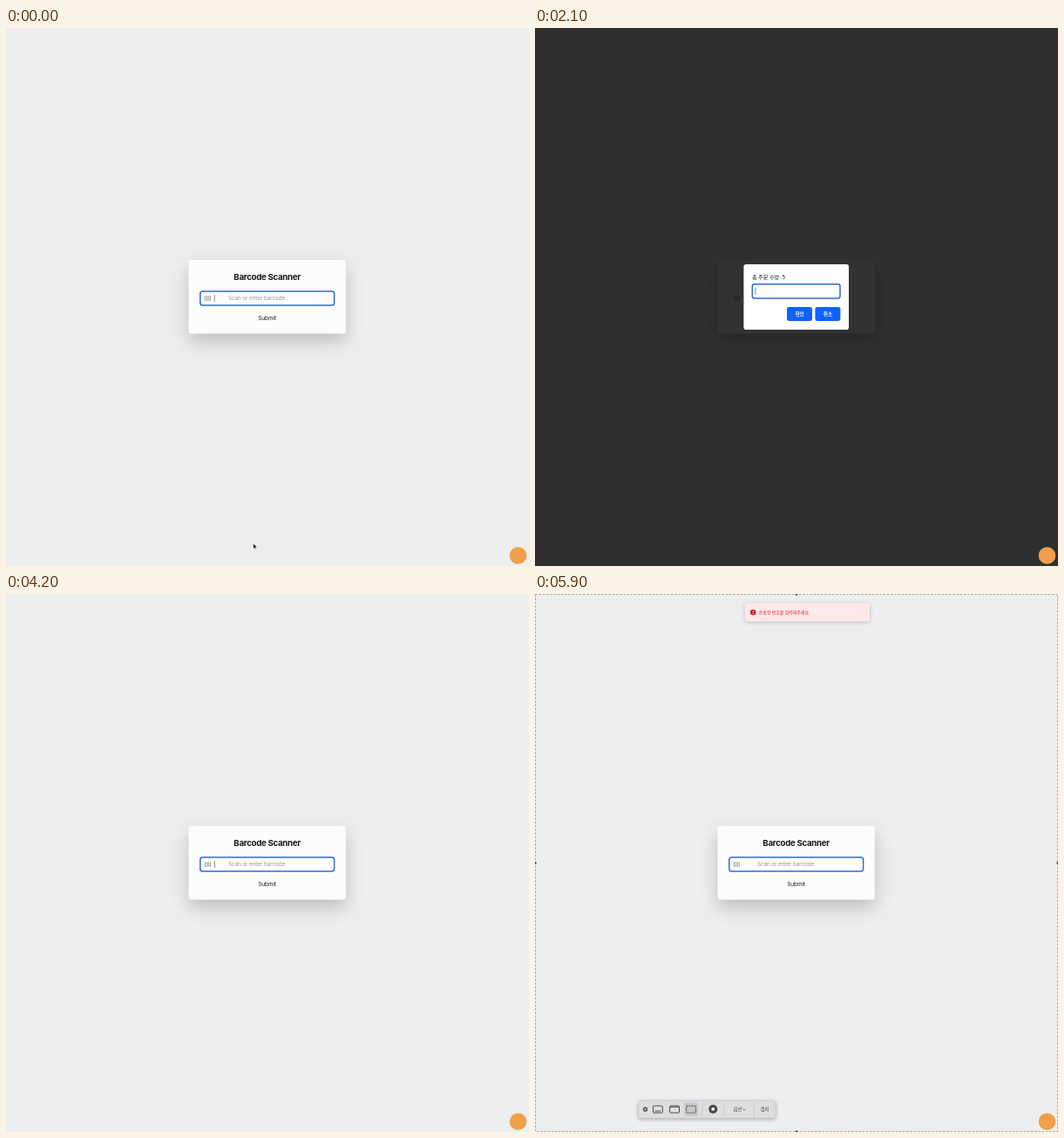
An HTML page that plays this animation: 600x617 px, repeating every 6000 ms.

```html
<!DOCTYPE html>
<html lang="en">
<head>
<meta charset="utf-8">
<title>Barcode Scanner</title>
<style>
  html, body { margin: 0; width: 100%; height: 100%; overflow: hidden; background: #edeef0; }
  svg { display: block; width: 600px; height: 617px; }
  text { font-family: Inter, "Noto Sans CJK KR", "Noto Sans CJK", sans-serif; font-size: 6.43px; fill: #18181b; }
  .mid { text-anchor: middle; }
  .card { filter: drop-shadow(0 9px 10px rgba(0, 0, 0, .2)); }
  .toast { filter: drop-shadow(0 1px 2px rgba(0, 0, 0, .2)); }
  .bar { filter: drop-shadow(0 1px 2px rgba(0, 0, 0, .3)); }
  .ring { fill: #fff; stroke: #2f6bd3; stroke-width: 1.5; }
  .ring.blur { stroke: #d4d4d8; stroke-width: .5; }
  .caret { fill: #666; }
  .btn { fill: #0f62fe; }
  .btn-text { font-size: 5.5px; font-weight: 700; fill: #fff; }
  .icon { fill: none; stroke: #4a4a4c; stroke-width: 1; }
  .sep { stroke: #c3c3c6; stroke-width: .6; }
  .bar text { font-size: 5.2px; fill: #48484a; }
</style>
</head>
<body>
<svg viewBox="0 0 600 617" xmlns="http://www.w3.org/2000/svg">
  <rect width="600" height="617" fill="#edeef0"/>

  <rect class="card" x="209.5" y="266" width="180.3" height="84.5" rx="3.2" fill="#fcfcfc"/>
  <text class="mid" x="299.6" y="289" style="font-size:9.65px;font-weight:700;letter-spacing:-.27px">Barcode Scanner</text>
  <rect id="codeBox" class="ring" x="222.8" y="302" width="153.8" height="16.1" rx="2.8"/>
  <path d="M228 307.2v5.8M229.7 307.2v5.8M231.3 307.2v5.8M232.9 307.2v5.8M234.5 307.2v5.8" stroke="#a2a6ad" stroke-width=".95"/>
  <text id="hint" x="254.9" y="312.3" style="fill:#9197a1;letter-spacing:-.12px">Scan or enter barcode</text>
  <text id="code" x="238.8" y="312.3"></text>
  <rect id="codeCaret" class="caret" y="306" width=".8" height="8"/>
  <text class="mid" x="299.6" y="335.4" style="letter-spacing:-.08px">Submit</text>

  <g id="modal">
    <rect width="600" height="617" opacity=".8"/>
    <rect x="239.4" y="271" width="120.6" height="75" rx="2.8" fill="#fff"/>
    <text x="248.9" y="287.7" style="font-size:6.2px;letter-spacing:-.1px">총 주문 수량: 5</text>
    <rect class="ring" x="249.3" y="293.8" width="100.7" height="16.2" rx="2.4"/>
    <text id="answer" x="252.5" y="304.2"></text>
    <rect id="answerCaret" class="caret" y="298" width=".8" height="8"/>
    <rect class="btn" x="289" y="320" width="29" height="16" rx="2.4"/>
    <text class="mid btn-text" x="303.5" y="330">확인</text>
    <rect class="btn" x="321.4" y="320" width="29" height="16" rx="2.4"/>
    <text class="mid btn-text" x="335.9" y="330">취소</text>
  </g>

  <g id="toast">
    <rect class="toast" x="240.8" y="10.4" width="143.2" height="21.2" rx="2" fill="#fde8ea"/>
    <circle cx="250.2" cy="21" r="3.3" fill="#d01f2a"/>
    <path d="M250.2 19.1v2.2M250.2 22.2v.8" stroke="#fff" stroke-width=".8"/>
    <text x="256.8" y="22.9" style="font-size:4.95px;font-weight:500;fill:#d5242c">운송장 번호를 입력해주세요.</text>
  </g>

  <circle cx="587.5" cy="605" r="9.8" fill="#efa04a"/>
  <path id="mouse" d="M283.8 591.2v6l1.4-1.3 .9 2.1 .9-.4-.9-2h1.9z" fill="#111" stroke="#fff" stroke-width=".4"/>

  <g id="capture">
    <rect x=".5" y=".5" width="599" height="616" fill="none" stroke="#929294" stroke-width=".8" stroke-dasharray="2.4 1.8"/>
    <g fill="#444">
      <circle cx="300" cy=".5" r="1.2"/><circle cx="300" cy="616.5" r="1.2"/>
      <circle cx=".5" cy="308.5" r="1.2"/><circle cx="599.5" cy="308.5" r="1.2"/>
    </g>
    <g class="bar">
      <rect x="118.7" y="581.3" width="157.2" height="19.8" rx="3.2" fill="#dedee0" stroke="#c6c6c9" stroke-width=".5"/>
      <circle cx="126.5" cy="591" r="2.7" fill="#58585a"/>
      <path d="M125.5 590l2 2m0-2l-2 2" stroke="#e4e4e6" stroke-width=".6"/>
      <rect class="icon" x="135.5" y="587" width="10.8" height="8" rx="1"/>
      <path class="icon" d="M137.5 593h6.8" stroke-width="1.4"/>
      <rect class="icon" x="154.7" y="587" width="10.8" height="8" rx="1"/>
      <path class="icon" d="M154.7 588.3h10.8"/>
      <rect x="171.2" y="583.2" width="15.8" height="15.8" rx="2" fill="#c8c8cb"/>
      <rect class="icon" x="173.7" y="587" width="10.8" height="8" rx="1" stroke-dasharray="1.6 .8"/>
      <circle cx="204.3" cy="590.8" r="5" fill="#454547"/>
      <rect x="202.5" y="589" width="3.6" height="3.6" rx=".5" fill="#eee"/>
      <path class="sep" d="M191.7 583.5v15M216.8 583.5v15M251.4 581.5v19.4"/>
      <text x="227.8" y="592.8">옵션</text>
      <path class="icon" d="M238.6 590.6l1.5 1.4 1.5-1.4" style="stroke-width:.7"/>
      <text class="mid" x="263.6" y="592.8">캡처</text>
    </g>
  </g>
</svg>
<script>
const LOOP = 6000, STEP = 100;
const el = {};
document.querySelectorAll('[id]').forEach(n => el[n.id] = n);

const show = (node, on) => node.style.display = on ? '' : 'none';
const within = (t, a, b) => t >= a && t < b;
const typed = (word, t, start) => word.slice(0, Math.max(0, Math.floor((t - start) / STEP) + 1));

function field(text, caret, value, lit) {
  text.textContent = value;
  const end = value ? text.getComputedTextLength() : 0;
  caret.setAttribute('x', +text.getAttribute('x') + end);
  show(caret, lit);
}

function draw(now) {
  const t = Math.floor(now % LOOP / STEP) * STEP;
  const asking = within(t, 2100, 4200);
  const code = t < 4200 ? typed('5120', t, 1400) : '';

  show(el.mouse, t < 1400);
  show(el.hint, !code);
  el.codeBox.classList.toggle('blur', asking);
  const codeLit = !asking && !within(t, 500, 1000) && !within(t, 4700, 5200) && t < 5700;
  field(el.code, el.codeCaret, code, codeLit);

  show(el.modal, asking);
  if (asking) field(el.answer, el.answerCaret, typed('test', t, 3400), !within(t, 2600, 3000));

  const p = Math.min(1, Math.max(0, (t - 4200) / 400));
  const ease = 1 - (1 - p) ** 3;
  show(el.toast, p > 0);
  el.toast.setAttribute('transform', `translate(0 ${-32 * (1 - ease)})`);
  el.toast.setAttribute('opacity', ease);

  show(el.capture, t >= 5800);
}

const start = performance.now();
function tick() {
  draw(performance.now() - start);
  requestAnimationFrame(tick);
}
tick();
</script>
</body>
</html>
```
